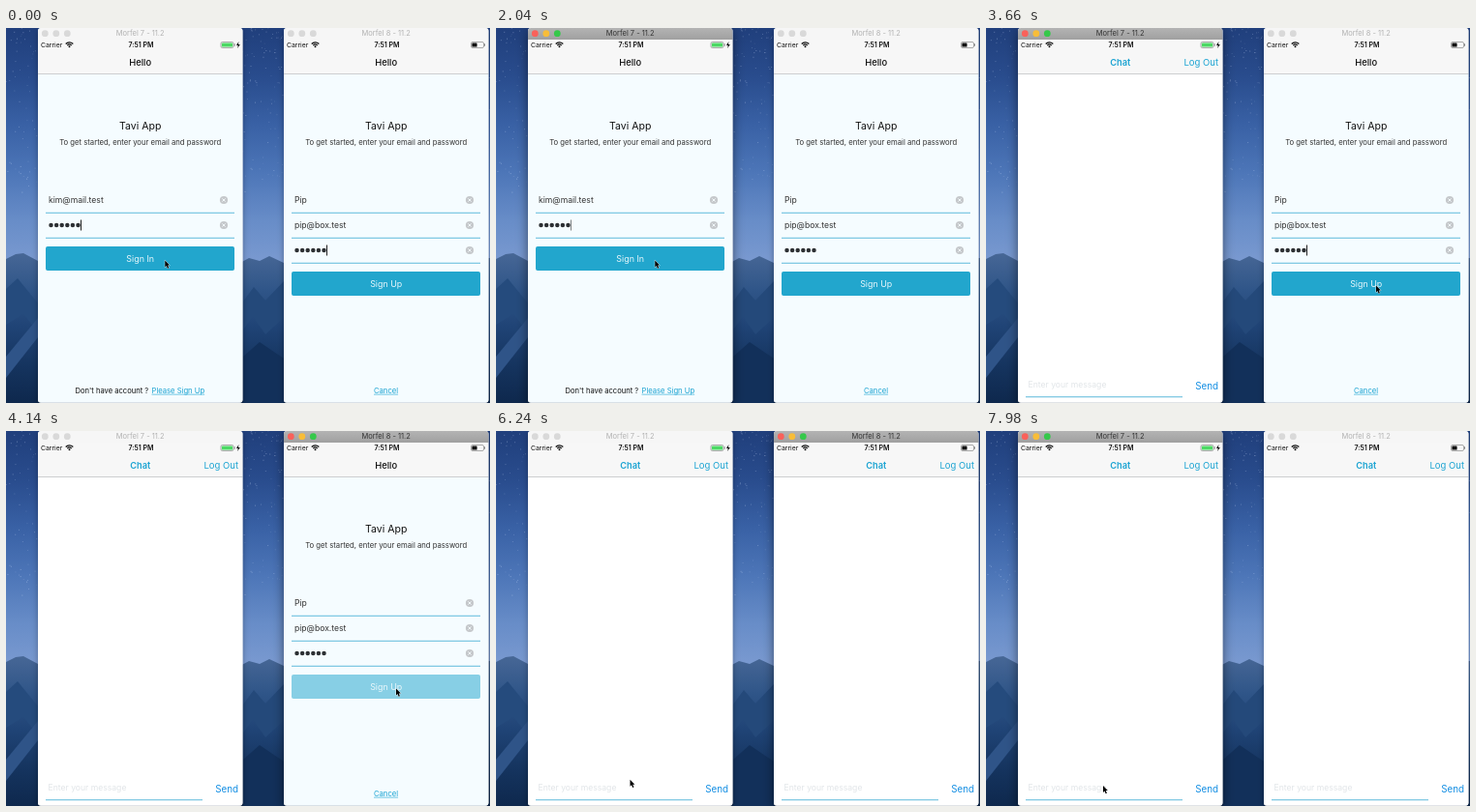
These frames come from a looping animation (500x388 px, 8 s). An HTML page with a canvas:

```html
<!DOCTYPE html>
<html lang="en">
<head>
<meta charset="utf-8">
<title>Chat demo</title>
<style>
  html, body { margin: 0; width: 100%; height: 100%; overflow: hidden; }
  canvas { display: block; width: 500px; height: 388px; }
</style>
</head>
<body>
<canvas id="stage"></canvas>
<script>
const W = 500, H = 388, LOOP = 8000;
const CYAN = '#1aa3d2', LINE = '#82c9e3';
const canvas = document.getElementById('stage');
const c = canvas.getContext('2d');
const dpr = window.devicePixelRatio || 1;
canvas.width = W * dpr;
canvas.height = H * dpr;

const clamp = v => Math.max(0, Math.min(1, v));
const ramp = (t, start, length) => clamp((t - start) / length);
const easeOut = p => 1 - (1 - p) ** 3;
const smooth = p => p * p * (3 - 2 * p);
const mix = (a, b, p) => a + (b - a) * p;

function rect(x, y, w, h, color) {
  c.fillStyle = color;
  c.fillRect(x, y, w, h);
}

function disc(x, y, r, color) {
  c.fillStyle = color;
  c.beginPath();
  c.arc(x, y, r, 0, 7);
  c.fill();
}

function round(x, y, w, h, r, color) {
  c.fillStyle = color;
  c.beginPath();
  c.roundRect(x, y, w, h, r);
  c.fill();
}

function polygon(points, color) {
  c.fillStyle = color;
  c.beginPath();
  for (let i = 0; i < points.length; i += 2) c.lineTo(points[i], points[i + 1]);
  c.closePath();
  c.fill();
}

function text(s, x, y, size, color, align = 'left', weight = 400) {
  c.font = `${weight} ${size}px Inter, "Liberation Sans", sans-serif`;
  c.textAlign = align;
  c.fillStyle = color;
  c.fillText(s, x, y);
}

function gradient(y0, y1, ...colors) {
  const g = c.createLinearGradient(0, y0, 0, y1);
  colors.forEach((color, i) => g.addColorStop(i / (colors.length - 1), color));
  return g;
}

function faded(alpha, draw) {
  c.save();
  c.globalAlpha *= alpha;
  draw();
  c.restore();
}

function drawWallpaper() {
  rect(0, 0, W, H, gradient(0, 250, '#203f7c', '#294c8d', '#3961a5', '#4d76b8', '#688dc8', '#7d9cd2'));
  let seed = 11;
  const random = () => (seed = seed * 16807 % 2147483647) / 2147483647;
  for (let i = 0; i < 900; i++) {
    const x = random() * W, y = random() ** 1.4 * 170;
    rect(x, y, 0.8, 0.8, `rgba(205,220,250,${0.15 + random() * 0.45})`);
  }
  polygon([0, 239, 10, 234, 18, 233, 33, 241, 240, 244, 251, 238, 262, 241, 272, 236, 287, 243, 500, 238, 500, 388, 0, 388],
    gradient(233, 388, '#476796', '#2f5588', '#1f4375', '#15345f', '#0e284d'));
  polygon([0, 270, 12, 259, 33, 285, 33, 315, 18, 296, 0, 307], '#254b7d');
  polygon([245, 283, 256, 268, 268, 282, 287, 262, 287, 300, 268, 317, 255, 299, 245, 312], '#24497a');
  polygon([0, 340, 33, 300, 33, 320, 0, 362], '#2f5488');
  polygon([245, 340, 262, 325, 287, 342, 287, 388, 245, 388], '#12305a');
}

function drawTitleBar(title, active) {
  round(33, 0, 211.5, 12, [3, 3, 0, 0], active ? gradient(0, 12, '#b3b3b3', '#a0a0a0') : '#f6f6f6');
  const lights = active ? ['#f9615a', '#f8bd38', '#35c84a'] : ['#d9d9d9', '#d9d9d9', '#d9d9d9'];
  lights.forEach((color, i) => disc(40.3 + i * 11.5, 5.7, 3.4, color));
  text(title, 138.7, 8.3, 7.5, active ? '#333' : '#b2b2b2', 'center');
}

function drawStatusBar(charging) {
  text('Carrier', 36, 20, 6.8, '#111');
  c.strokeStyle = '#111';
  c.lineWidth = 1.3;
  for (const r of [3, 5.2]) {
    c.beginPath();
    c.arc(65.5, 20, r, -Math.PI * 0.76, -Math.PI * 0.24);
    c.stroke();
  }
  disc(65.5, 19.2, 1, '#111');
  text('7:51 PM', 139.5, 20.1, 7, '#111', 'center', 600);
  const x = charging ? 222 : 226.5;
  c.strokeStyle = '#777';
  c.lineWidth = 0.6;
  c.beginPath();
  c.roundRect(x, 14.5, 13, 6, 1.5);
  c.stroke();
  rect(x + 13.6, 16.3, 0.9, 2.4, '#777');
  round(x + 0.9, 15.4, charging ? 11.2 : 5.2, 4.2, 0.7, charging ? '#4cd964' : '#111');
  if (charging) polygon([240.4, 14, 238, 18, 239.7, 18, 239.2, 21, 241.8, 16.9, 240, 16.9], '#111');
}

function drawHeader(p) {
  rect(33, 12, 211.5, 35, '#f7f7f7');
  rect(33, 47, 211.5, 1, '#cdcfd0');
  faded(1 - p, () => text('Hello', 138.7 - 50 * p, 39, 9.4, '#111', 'center', 500));
  faded(p, () => {
    text('Chat', mix(190, 138.7, p), 39, 9.2, CYAN, 'center', 600);
    text('Log Out', 240, 39, 9.5, CYAN, 'right');
  });
}

function drawField(value, y) {
  if (value) text(value, 44, y + 3, 8.6, '#333');
  else for (let i = 0; i < 6; i++) disc(46.5 + i * 5.6, y, 2.25, '#2d3033');
  disc(225, y, 4.1, '#c5c8cb');
  c.strokeStyle = '#f5fcff';
  c.lineWidth = 0.9;
  c.beginPath();
  c.moveTo(223.4, y - 1.6); c.lineTo(226.6, y + 1.6);
  c.moveTo(226.6, y - 1.6); c.lineTo(223.4, y + 1.6);
  c.stroke();
  rect(41, y + 12.7, 195, 1.3, LINE);
}

function drawForm(phone, press, caret) {
  rect(33, 48, 211.5, 340, '#f5fcff');
  text('Tavi App', 138.7, 105, 10.5, '#111', 'center');
  text('To get started, enter your email and password', 138.7, 120.7, 7.7, '#333', 'center');
  phone.fields.forEach((value, i) => drawField(value, 178 + i * 26));
  const last = 152 + phone.fields.length * 26;
  faded(caret, () => rect(77, last - 5.5, 1, 11, '#222'));
  faded(1 - 0.53 * press, () => round(41, last + 22, 195, 25, 2, '#22a6cd'));
  text(phone.button, 138.7, last + 38, 8.9, '#e9f7fb', 'center');
  const link = phone.link;
  if (phone.hint) text(phone.hint, 71.5, 377.7, 7.6, '#111');
  const x = phone.hint ? 150.5 : 126;
  text(link, x, 377.7, 7.65, CYAN);
  rect(x, 378.8, c.measureText(link).width, 0.6, CYAN);
}

function drawChat() {
  rect(33, 48, 211.5, 340, '#fff');
  text('Enter your message', 43.5, 372, 8.6, '#e1e5e8');
  rect(41, 381, 162, 1.3, LINE);
  text('Send', 240, 373.5, 9.8, '#158fe3', 'right');
}

function drawPhone(phone, t, active) {
  const p = easeOut(ramp(t, phone.push, 500));
  const press = ramp(t, phone.press, 100) - ramp(t, phone.press + 250, 200);
  const blink = (t + phone.blink) % 1100;
  const caret = 1 - ramp(blink, 450, 100) + ramp(blink, 940, 100);
  c.save();
  c.translate(phone.x, 0);
  c.shadowColor = `rgba(0,0,0,${active ? 0.5 : 0.3})`;
  c.shadowBlur = (active ? 12 : 6) * dpr;
  c.shadowOffsetY = 3 * dpr;
  round(33, 0, 211.5, 387.5, 3, '#fff');
  c.shadowColor = 'transparent';
  c.beginPath();
  c.roundRect(33, 0, 211.5, 387.8, 3);
  c.clip();
  if (p < 1) {
    c.save();
    c.translate(-63 * p, 0);
    drawForm(phone, press, caret);
    c.restore();
  }
  if (p > 0) {
    c.save();
    c.translate(211.5 * (1 - p), 0);
    drawChat();
    c.restore();
  }
  drawHeader(p);
  drawStatusBar(phone.charging);
  drawTitleBar(phone.title, active);
  c.restore();
}

function drawPointer(t) {
  const toRight = smooth(ramp(t, 2650, 700));
  const toLeft = smooth(ramp(t, 5520, 850));
  const x = mix(mix(164.3, 403, toRight), 121, toLeft);
  const y = mix(mix(240.5, 266.5, toRight), 367, toLeft);
  c.save();
  c.translate(x, y);
  c.scale(0.85, 0.85);
  c.beginPath();
  const outline = [0, 0, 0, 8.2, 1.8, 6.5, 3.1, 9.6, 4.6, 9, 3.3, 6, 5.7, 5.8];
  for (let i = 0; i < outline.length; i += 2) c.lineTo(outline[i], outline[i + 1]);
  c.closePath();
  c.lineWidth = 0.9;
  c.strokeStyle = '#fff';
  c.stroke();
  c.fillStyle = '#000';
  c.fill();
  c.restore();
}

const left = {
  x: 0, title: 'Morfel 7 - 11.2', charging: true, fields: ['kim@mail.test', ''],
  button: 'Sign In', hint: "Don't have account ?", link: 'Please Sign Up',
  press: 1030, push: 2150, blink: 55
};
const right = {
  x: 254, title: 'Morfel 8 - 11.2', charging: false, fields: ['Pip', 'pip@box.test', ''],
  button: 'Sign Up', link: 'Cancel', press: 4050, push: 4680, blink: 0
};

function frame() {
  const t = performance.now() % LOOP;
  const rightActive = t >= 3820 && t < 6500;
  const leftActive = t >= 450 && !rightActive;
  c.setTransform(dpr, 0, 0, dpr, 0, 0);
  drawWallpaper();
  const phones = rightActive ? [left, right] : [right, left];
  for (const phone of phones) drawPhone(phone, t, phone === left ? leftActive : rightActive);
  drawPointer(t);
  requestAnimationFrame(frame);
}
frame();
</script>
</body>
</html>
```
